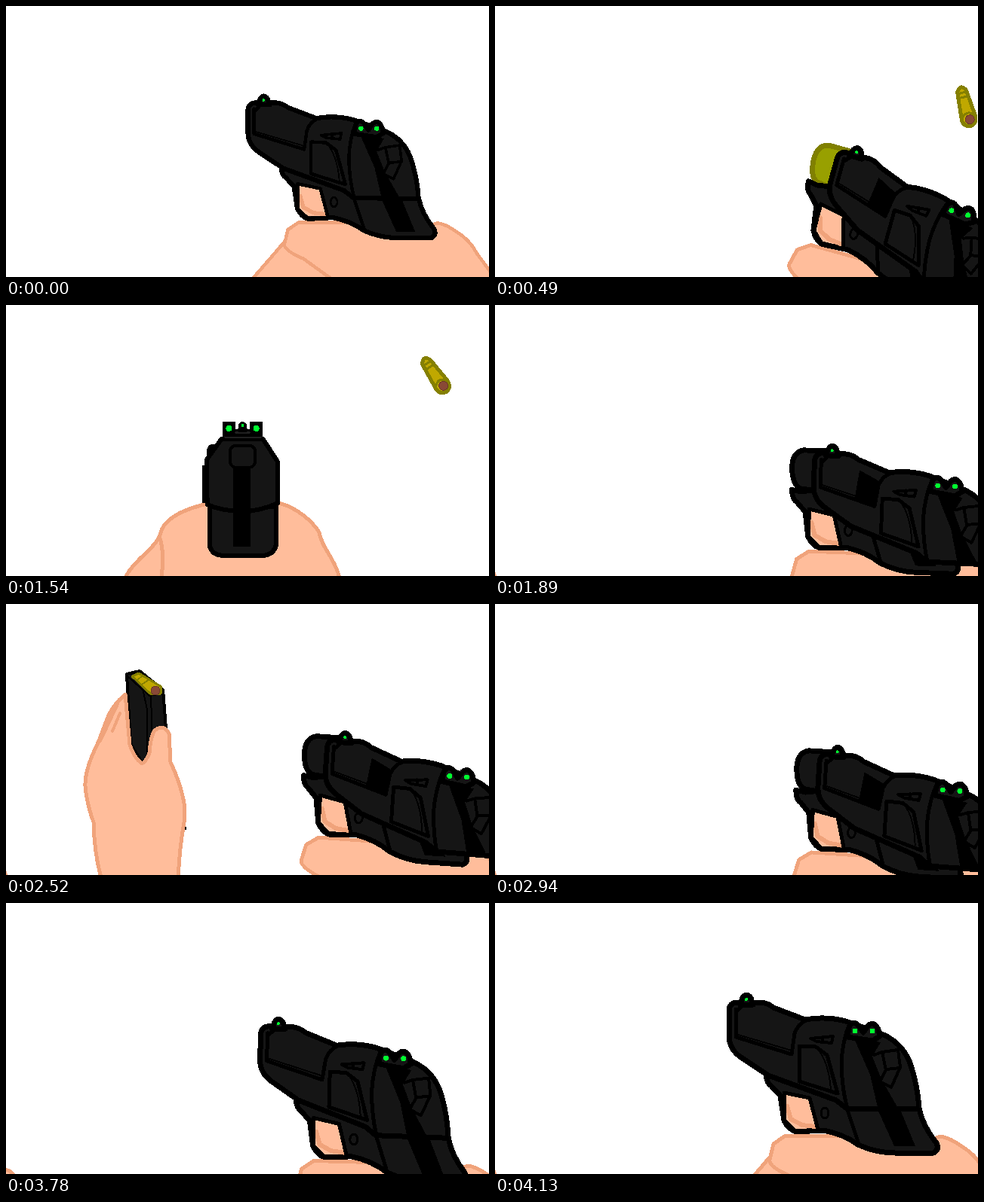
Write an HTML page that moves like this. It is 640 px wide and 360 px high and loops after 4.27 s.

```html
<!DOCTYPE html>
<html>
<head>
<meta charset="utf-8">
<style>
html, body { margin: 0; width: 100%; height: 100%; overflow: hidden; background: #fff; }
svg { display: block; width: 640px; height: 360px; }
.skin { fill: #ffbd9b; stroke: #f0a37b; stroke-width: 5; }
.crease { fill: none; stroke: #f0a37b; stroke-width: 5; }
.metal { fill: #151515; stroke: #000; stroke-width: 7; }
.line { fill: none; stroke: #000; stroke-width: 5; }
.thin { fill: none; stroke: #000; stroke-width: 2; }
.dot { fill: #00ff30; }
.brass { fill: #c0a800; stroke: #858000; stroke-width: 5; }
.copper { fill: #894936; stroke: #6c3829; stroke-width: 1; }
.hot { fill: #98a000; stroke: #808000; }
path { stroke-linejoin: round; stroke-linecap: round; }
</style>
</head>
<body>
<svg viewBox="0 0 640 360" shape-rendering="crispEdges">
  <path id="corner" fill="#f0a37b" d="M0 353L2 360H0Z"/>

  <g id="loader">
    <path class="metal" style="stroke-width:4" d="M160 93L177 89L208 114L212 165L218 211L181 212L165 186Z"/>
    <path class="thin" d="M160 95L190 122L208 119M182 117L187 140V205M192 122L194 185"/>
    <path class="brass" style="stroke-width:3" d="M167 96L176 92L206 110L205 119L191 119Z"/>
    <path class="thin" style="stroke:#858000" d="M174 101L181 95M180 107L190 100"/>
    <circle class="copper" cx="198" cy="115" r="6"/>
    <path class="skin" d="M158 120Q140 135 133 155L123 182Q104 220 105 242Q107 265 116 290Q117 335 128 370H228Q229 330 236 290V265Q232 240 218 210L216 172Q208 158 196 169Q191 180 190 198Q185 210 180 212Q170 205 164 187Z"/>
    <path class="crease" style="stroke-width:4" d="M148 133L134 163L125 182M151 145L141 169"/>
    <path d="M237 296h2v4h-2z"/>
  </g>

  <g id="palm">
    <path class="skin" d="M214 480V362C214 310 222 285 236 258L242 203Q248 187 264 194Q284 210 292 242Q318 206 356 202L382 207L335 264L385 238L404 270L358 316L408 285L430 310L410 326Q424 332 425 346L400 354L385 362V480Z"/>
    <path class="crease" d="M292 242Q300 270 291 300M357 352Q382 328 410 326M358 316L385 278"/>
  </g>

  <g id="aim">
    <path class="skin" d="M150 420Q155 370 164 358C180 335 202 326 207 303C215 285 240 275 270 268H362C385 274 405 292 414 306C417 325 433 340 439 360L455 420Z"/>
    <path class="crease" d="M204 312Q211 330 207 365V420"/>
    <path d="M260 218h7v50h-7zM266 205Q265 189 277 190L284 200L272 212Z"/>
    <path class="metal" style="stroke-width:6" d="M270 273V324Q273 336 286 337H342Q356 335 358 321V273Z"/>
    <path class="metal" style="stroke-width:6" d="M267 270L266 211L286 183H340L360 214V268Q335 279 312 279Q286 278 267 270Z"/>
    <path d="M301 220h23v105h-23z"/>
    <rect class="metal" style="stroke-width:4" x="297" y="192" width="33" height="29" rx="8"/>
    <path d="M287 161h17v10q9-4 19 0v-10h17v25h-53z"/>
    <path class="thin" style="stroke:#202020" d="M304 175h19M290 181h48"/>
    <path d="M308 175V164Q313 157 319 164V175Z"/>
    <circle class="dot" cx="295.5" cy="169.5" r="4"/>
    <circle class="dot" cx="331.5" cy="169.5" r="4"/>
    <circle class="dot" cx="313.5" cy="165.5" r="2"/>
  </g>

  <g id="gun">
    <path id="wrist" class="skin" d="M368 333L345 360L300 412H470Z"/>
    <path class="skin" d="M460 412L392 363Q362 350 364 341L369 320L385 309L450 309L560 320L590 310Q603 312 618 323Q638 335 648 355L690 412Z"/>
    <path id="barrel" class="metal" d="M402 173H373Q358 176 358 196Q359 221 371 225L402 228Z"/>
    <path class="metal" d="M359 227Q360 240 366 243L378 256L383 289Q389 301 399 304L435 302Q462 307 481 321Q505 332 530 332H581Q589 328 585 319Q566 295 562 272L466 230L402 224L372 229Z"/>
    <path class="skin" style="stroke:none" d="M386 254L416 260L427 299L399 300L386 288Z"/>
    <path class="crease" style="stroke-width:6" d="M387 270L392 287L407 295L424 297"/>
    <path class="line" d="M383 252L417 259L428 301M383 253L384 289L397 302"/>
    <ellipse class="thin" style="stroke-width:3" cx="437" cy="279" rx="5" ry="7"/>
    <path class="line" d="M466 272L482 320"/>
    <path d="M506 272H536L557 323H529Z"/>
    <g id="slide">
      <path class="metal" d="M310 142Q311 133 320 132H352Q362 133 369 139L411 155Q437 150 465 157L510 173Q537 183 549 210Q560 240 562 274L466 273L452 262L362 229L326 205Q311 195 310 178Z"/>
      <path class="line" d="M319 141V178L393 201L397 173Q402 160 412 156M319 145L326 138"/>
      <path class="thin" d="M322 175L390 195"/>
      <path id="port" d="M371 153L400 168L394 203L366 190Z"/>
      <path class="line" d="M403 190L425 191L440 202L454 253L403 237Z"/>
      <path class="thin" d="M427 193Q442 211 445 247"/>
      <path class="line" style="stroke-width:4" d="M418 180L448 177L446 186L426 184ZM434 178V184"/>
      <path class="line" d="M469 162Q460 185 459 215Q460 248 467 273"/>
      <path d="M475 178L511 185L500 204L512 234L536 276H508L497 228Z"/>
      <path class="line" style="stroke-width:4" d="M502 202L513 198L534 195L537 218L525 245L510 237L518 222L513 198M518 221L537 219"/>
      <path class="metal" d="M467 178L469 165Q474 155 481 162L488 172L494 163Q502 156 508 168L510 177L500 183Z"/>
      <path class="metal" d="M325 135L328 126Q333 118 339 126L342 135Z"/>
      <circle class="dot" cx="477" cy="170" r="3.5"/>
      <circle class="dot" cx="500" cy="170" r="3.5"/>
      <circle class="dot" cx="333" cy="128" r="2"/>
    </g>
  </g>

  <path id="flash" class="brass" d="M322 148L300 122L298 142L270 118L280 146L248 152L278 162L262 188L296 170L308 192Z"/>

  <g id="shell">
    <path class="brass" d="M-11 -20Q-6 -32 1 -22L11 14Q11 25 2 26Q-8 25 -8 14Z"/>
    <path class="crease" style="stroke:#858000;stroke-width:3" d="M-10 -18L0 -20M-10 -12L2 -14M-6 13Q2 3 9 13"/>
    <circle class="copper" cx="3" cy="17" r="6"/>
  </g>
</svg>
<script>
const el = id => document.getElementById(id);
const show = (id, on) => el(id).style.display = on ? '' : 'none';
const move = (id, x, y, extra = '') =>
  el(id).setAttribute('transform', `translate(${x} ${y}) ${extra}`);
const LOOP = 4270, STEP = 70, LAST = 4130;
const FIRST_SHOT = 140, SECOND_SHOT = 1260;

// Smooth 0 to 1 between two times; pulse rises and then falls again.
function ease(t, from, to) {
  const u = Math.min(1, Math.max(0, (t - from) / (to - from)));
  return u * u * (3 - 2 * u);
}
const pulse = (t, a, b, c, d) => ease(t, a, b) - ease(t, c, d);

function drawGun(t) {
  const kick = pulse(t, 70, 420, 490, 700);
  const lower = ease(t, 1540, 1890), lift = ease(t, 1890, 2520);
  const rack = ease(t, 2660, 3430), ready = ease(t, 3430, 4130);
  const open = pulse(t, 140, 210, 490, 630) + pulse(t, 1610, 1680, 3220, 3360);

  const x = 387 + 45 * kick + 30 * lower + 16 * rack - 49 * ready;
  const y = 238 + 27 * kick + 35 * lower - 17 * lift + 65 * rack - 67 * ready;
  const turn = 15.4 * kick + 2.2 * lower + 1.8 * lift - .9 * rack - 3.1 * ready;
  const scale = .897 + .088 * (kick + lower) + .015 * rack;
  move('gun', x, y, `rotate(${turn}) scale(${scale}) translate(-384 -254)`);
  move('slide', 78 * open, 44 * open);
  show('port', open > .3);
}

function drawAim(t) {
  const rise = ease(t, 770, 1050), jolt = pulse(t, 1190, 1330, 1330, 1610);
  move('aim', 312, 384 - 24 * rise - 26 * jolt,
    `scale(${1 + .05 * jolt}) translate(-312 -360)`);
}

function drawHands(t) {
  const below = 1 - ease(t, 2240, 2520), insert = ease(t, 2520, 2870);
  move('loader', 220 * insert - 40 * below, 270 * below + 280 * insert);
  show('loader', t >= 2310 && t <= 2870);

  const away = 1 - pulse(t, 2870, 3430, 3430, 3850);
  move('palm', -280 * away, 175 * away);
  show('palm', t >= 2940 && t < 3850);
}

// The ejected shell spins along a parabola.
function drawShell(t) {
  const second = t >= SECOND_SHOT;
  const age = t - (second ? SECOND_SHOT : FIRST_SHOT);
  const u = age / STEP - 5;
  move('shell', 625 + (second ? 55 : 24) * u, 134 + 55 * u + 14 * u * u,
    `rotate(${20 * u - 4})`);
  show('shell', age >= STEP && age <= 7 * STEP);
}

function draw(t) {
  const aiming = t >= 840 && t < 1680;
  const firing = t >= FIRST_SHOT && t < 560;
  show('gun', !aiming);
  show('aim', aiming);
  show('corner', t >= 1820);
  show('flash', firing && t < FIRST_SHOT + 2 * STEP);
  show('wrist', t < FIRST_SHOT || t >= 3500 || (t > 600 && t < 840));
  el('barrel').classList.toggle('hot', firing);
  drawGun(t);
  drawAim(t);
  drawHands(t);
  drawShell(t);
}

const start = performance.now();
function tick() {
  const t = Math.floor((performance.now() - start) % LOOP / STEP) * STEP;
  draw(t < FIRST_SHOT ? 0 : Math.min(t, LAST));
  requestAnimationFrame(tick);
}
tick();
</script>
</body>
</html>
```
